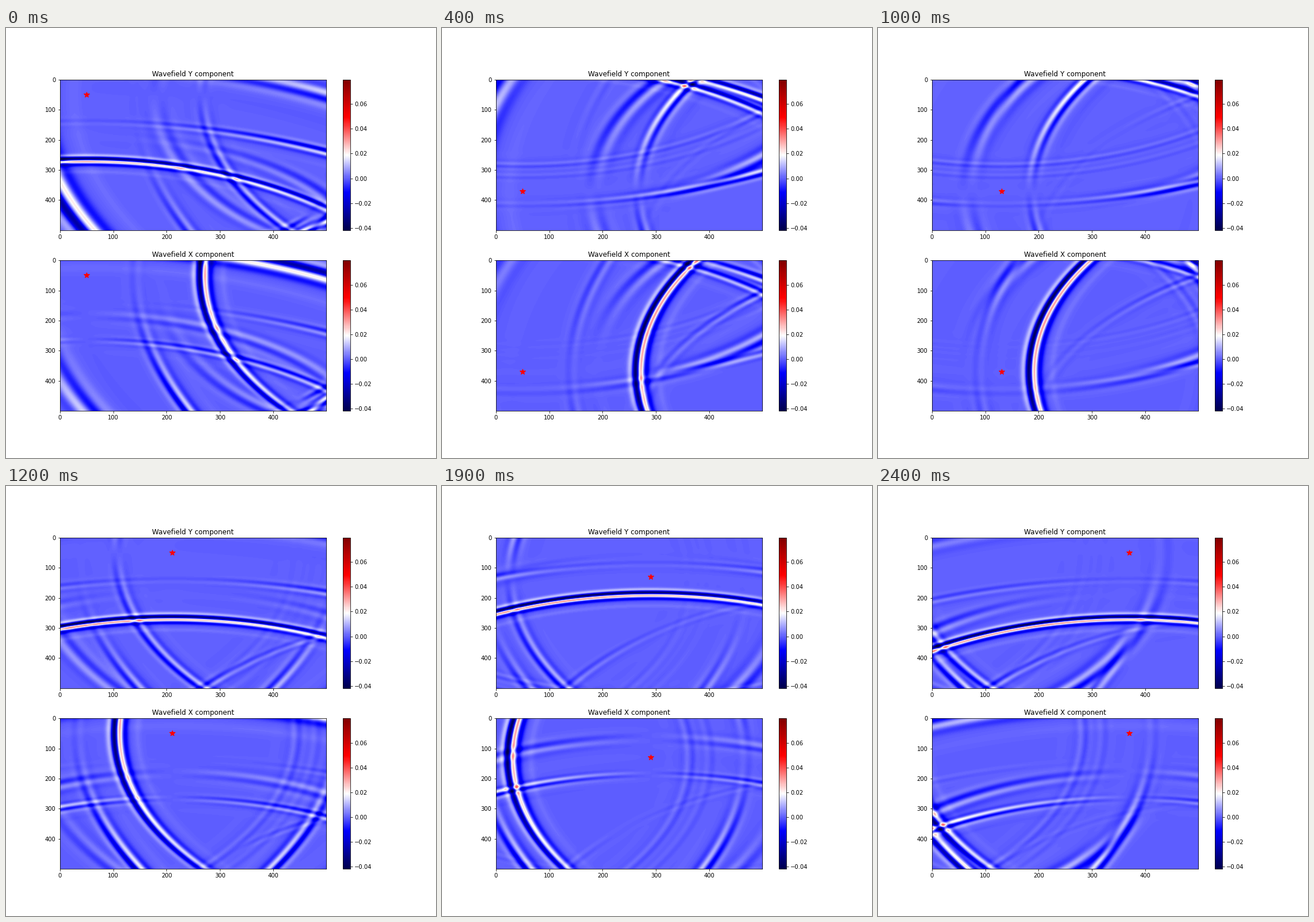
A matplotlib script for the animation above (2.5 s loop, 748 px wide and 748 px high).

```python
import numpy as np
import matplotlib.pyplot as plt
from matplotlib.animation import FuncAnimation

SIZE = 500          # model edge
ALPHA = 1.47        # fast / slow speed ratio
TIME = 660          # travel time in slow-speed units
STARTS = 50 + 80 * np.arange(6)

axis = np.arange(0, SIZE, 2) + 0.5
X, Y = np.meshgrid(axis, axis)


def bump(u, centre, width):
    return np.exp(-0.5 * ((u - centre) / width) ** 2)


def wavelet(u, scale=1.0):
    """Pulse shape; u is positive ahead of the crest."""
    u = u / scale
    return (1.1 * bump(u, 0, 4.3) - 1.3 * bump(u, 10, 4.5)
            - 0.5 * bump(u, -9.5, 4.8) + 0.45 * bump(u, 19, 4.5)
            + 0.07 * bump(u, -34, 5))


def bounce(h1, h2, t, v1, v2):
    """Arrival time and leg sines of a converted reflection (Snell's law)."""
    d = t * h1 / (h1 + h2)
    low, high = np.minimum(t, 0), np.maximum(t, 0)
    for _ in range(7):
        p, q = np.hypot(h1, d), np.hypot(h2, t - d)
        slope = d / (p * v1) - (t - d) / (q * v2)
        curve = h1 * h1 / (p * p * p * v1) + h2 * h2 / (q * q * q * v2)
        d = np.clip(d - slope / curve, low, high)
    p, q = np.hypot(h1, d), np.hypot(h2, t - d)
    return p / v1 + q / v2, d / p, (t - d) / q


def cosine(s):
    return np.sqrt(np.maximum(1 - s * s, 0))


def shear(field, sin, side):
    return np.array([field * cosine(sin), side * field * sin])


def pressure(field, sin, side):
    return np.array([-side * field * sin, field * cosine(sin)])


def shear_echo(h1, h2, t):
    r = np.hypot(h1 + h2 + 21, t)
    amp = np.minimum(0.031 - 0.00003 * t, 0.036)
    return amp * wavelet(r - 700), t / r


def far_wall(h1, h2, t, edge):
    """Echoes from the right or bottom wall, as (main, cross) components."""
    out = shear(*shear_echo(h1, h2, t), 1)

    # the main echo reflected again at the neighbouring wall
    field, sin = shear_echo(h1, h2, t + 2 * edge)
    field = 2 * field * sin ** 2 * np.exp(-edge / 90)
    out += shear(field, sin, 1) * np.array([-0.25, 0.8])[:, None, None]

    r = np.hypot(h1 + h2, t)
    sin = t / r
    amp = 0.019 * (cosine(sin) + sin)
    out += pressure(amp * wavelet(r - 993, 2.0), sin, 1)

    time, s1, s2 = bounce(h1, h2, t, ALPHA, 1)
    amp = 0.032 * s1 ** 2 * (cosine(s1) + s1) + 0.001
    out += shear(amp * wavelet(time - TIME, 1.1), s2, 1)

    time, s1, s2 = bounce(h1, h2, t, 1, ALPHA)
    amp = -0.025 * s1 * (cosine(s1) - 0.5 * s1)
    out += pressure(amp * wavelet(ALPHA * (time - TIME), 1.6), s2, 1)
    return out


def near_wall(h1, h2, t):
    """Echoes from the left or top wall."""
    r = np.hypot(h1 + h2, t)
    faint = 0.0022 * wavelet(r - 648) + 0.0012 * wavelet(r - 685)
    out = shear(faint, t / r, -1)

    time, s1, s2 = bounce(h1, h2, t, ALPHA, 1)
    amp = 0.046 * s1 ** 2 * cosine(s1) + 0.001
    out += shear(amp * wavelet(time - TIME, 1.1), s2, -1)

    time, s1, s2 = bounce(h1, h2, t, 1, ALPHA)
    amp = 0.07 * s1 ** 2 * cosine(s1) + 0.001
    out += pressure(amp * wavelet(ALPHA * (time - TIME), 1.6), s2, -1)
    return out


def wavefield(sx, sy):
    sides = far_wall(SIZE - sx, SIZE - X, Y - sy, SIZE - Y)
    sides += near_wall(sx, X, Y - sy)
    ends = far_wall(SIZE - sy, SIZE - Y, X - sx, SIZE - X)
    ends += near_wall(sy, Y, X - sx)
    return ends[0] + sides[1], sides[0] + ends[1]


def source(i):
    return STARTS[i // 6], STARTS[i % 6]


fig, axes = plt.subplots(2, 1, figsize=(748 / 72, 748 / 72), dpi=72)
images, stars = [], []
limits = [(-0.0416, 0.0794), (-0.0418, 0.0799)]
for ax, name, (low, high) in zip(axes, "YX", limits):
    image = ax.imshow(np.zeros_like(X), cmap="seismic", vmin=low, vmax=high,
                      aspect="auto", interpolation="bilinear",
                      extent=(-0.5, SIZE - 0.5, SIZE - 0.5, -0.5))
    fig.colorbar(image, ax=ax)
    ax.set_title(f"Wavefield {name} component")
    star, = ax.plot([50], [50], "r*", markersize=10)
    ax.set_xlim(-0.5, SIZE - 0.5)
    ax.set_ylim(SIZE - 0.5, -0.5)
    images.append(image)
    stars.append(star)


def update(i):
    sx, sy = source(i)
    for image, star, field in zip(images, stars, wavefield(sx, sy)):
        image.set_data(field)
        star.set_data([sx], [sy])
    return images + stars


anim = FuncAnimation(fig, update, frames=25, interval=100, repeat=True,
                     repeat_delay=0, blit=False)
plt.show()
```
